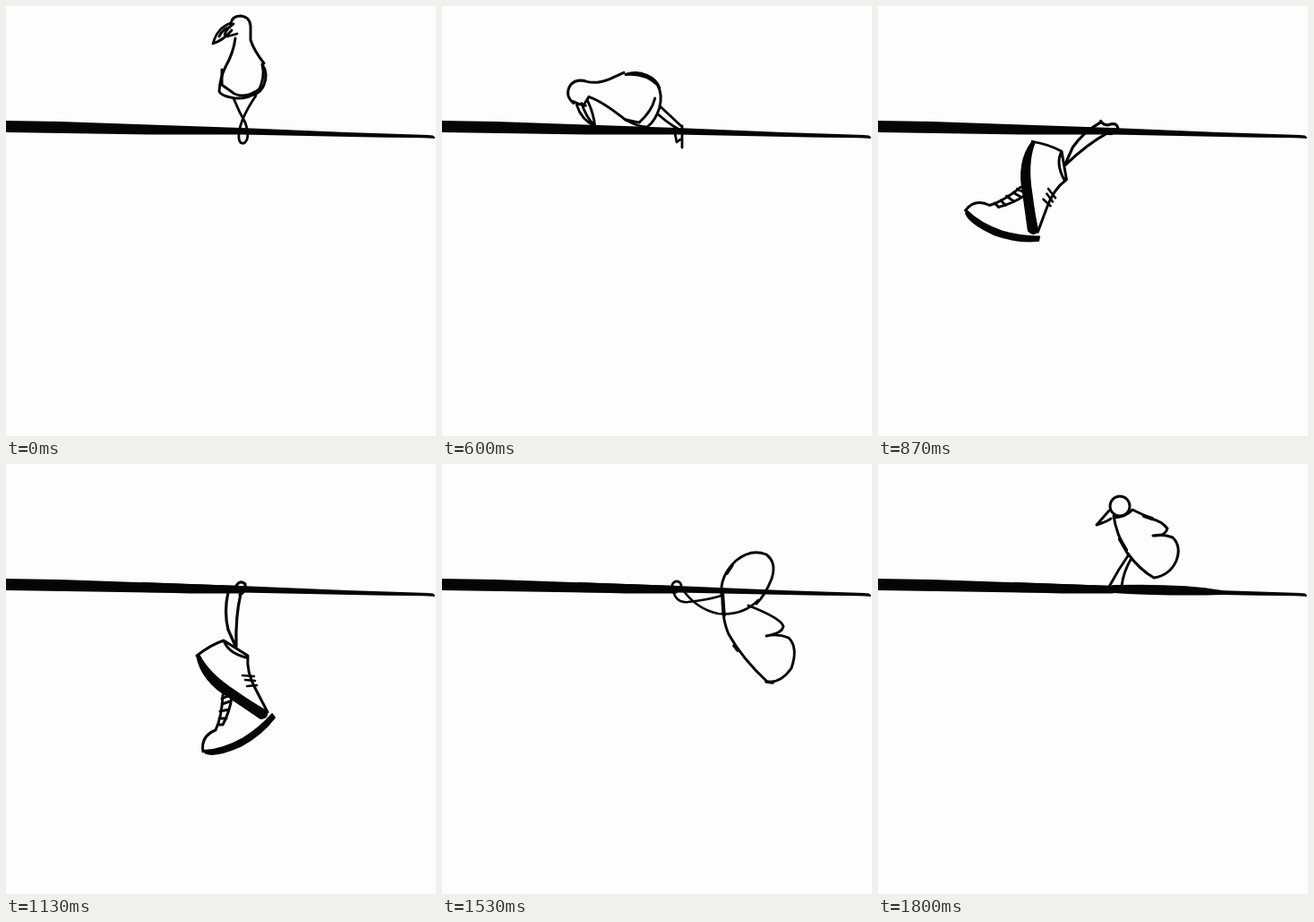
Write an HTML page with a canvas that moves like this. It is 480x480 px and loops after 1.87 s.

```html
<!DOCTYPE html>
<html lang="en">
<head>
<meta charset="utf-8">
<title>Bird on a wire</title>
<style>
html, body { margin: 0; width: 100%; height: 100%; overflow: hidden; background: #fdfdfd }
canvas { display: block; width: 480px; height: 480px }
</style>
</head>
<body>
<canvas id="stage" width="480" height="480"></canvas>
<script>
const LOOP = 1870, INK = '#050505', PAPER = '#fdfdfd';
const ctx = document.getElementById('stage').getContext('2d');

// kind: number = line width, 'paper' = white fill, 'ink' = black fill with a soft edge
const part = (kind, d) => ({ kind, path: new Path2D(d) });

const wire = part('ink', 'M0 129L60 130L160 133.5L262 137L380 142L472 145Q477 145 478 147Q472 146 410 145.5L262 142.5L160 142.5L0 140Z');
const wireJoint = part('ink', 'M152 133L262 137L262 143.5L205 143.5L152 142Z');
const wireBulge = part('ink', 'M262 136Q340 134 384 142L384 145Q330 147 262 143Z');

const upright = [
  part('paper', 'M251 20Q252 11 262 11Q272 12 273 22L273 38Q277 50 287 63Q293 80 280 97Q255 106 238 95Q239 75 245 68Q254 52 256 36Z'),
  part(3, 'M251 20Q252 11 262 11Q272 12 273 22L273 38Q277 50 288 64M256 36Q254 52 245 68Q239 80 238 95Q239 100 255 103Q270 104 281 96'),
  part(3, 'M286 65Q293 75 288 88Q285 96 277 99M286 65Q290 80 281 96M241 71L241 88Q248 93 255 98Q268 104 284 92'),
  part(2.8, 'M251 19Q236 24 231 42Q243 38 252 27M254 20Q246 25 244 32M238 34Q243 24 250 24M247 34L258 31'),
  part(2.8, 'M254 103Q260 118 267 130Q273 148 266 153Q259 155 260 142Q262 125 279 100')
];

const leanLegs = [part(2.9, 'M241 113Q252 126 267 136M260 96Q264 110 261 134M248 113L262 132M261 135Q258 152 264 154Q271 150 268 135')];
const leanBody = [
  part('paper', 'M183 38Q183 24 196 22Q206 22 211 33Q220 47 246 58Q262 72 261 94Q256 106 243 113Q228 120 218 116Q208 105 208 92Q206 60 200 47Z'),
  part(3, 'M183 38Q183 24 196 22Q206 22 211 33Q216 43 230 50L246 57M200 47Q206 60 208 93Q213 113 219 117Q230 119 243 113Q257 106 261 94Q262 75 246 60'),
  part(3, 'M246 60Q257 66 261 78Q265 90 260 98M208 93L216 107Q235 109 248 102'),
  part(2.9, 'M184 36Q186 44 190 50M184 42Q175 57 180 73Q190 62 196 47M180 73Q181 58 189 45M188 48L200 46')
];

const flipLegs = [part(2.8, 'M236 105L267 134M235 115Q250 130 265 138M259 137L262 152L266 149M268 134L268 158')];
const flipBody = [
  part('paper', 'M202 98Q190 103 176 118Q166 130 163 142Q150 150 153 162Q156 174 184 175L172 154Q205 145 228 130Q240 105 250 80Q262 45 249 44Q240 46 230 73Q218 50 213 54L203 72Z'),
  part(3, 'M202 98Q190 103 176 118Q166 130 164 143Q151 150 153 161Q156 174 170 174L184 175Q182 166 169 157Q167 166 169 174M171 160Q178 166 181 173'),
  part(4.4, 'M170 156Q205 149 229 130Q236 123 235 115M202 102Q224 103 236 119'),
  part(3, 'M201 98Q201 83 203 72Q207 64 216 76Q204 60 213 54C222 49 224 68 231 73C237 69 236 44 249 44C260 46 257 65 250 82L236 110M196 99L202 104')
];

const shoes = [
  part(3.2, 'M248 143Q243 165 248 185L256 203M262 145Q256 170 257 204M247 142Q255 143 257 136Q261 129 267 134Q268 143 261 146'),
  part('paper', 'M242 257Q241 282 234 296Q219 304 219 321L265 308L298 280L285 262Z'),
  part(3, 'M242 258Q241 282 234 297Q217 304 220 321M252 260Q250 276 242 291M241 268L250 265M239 276L249 274M238 284L246 284M236 291L242 291M241 262L250 258'),
  part('ink', 'M221 320Q242 319 265 306Q284 294 297 279L300 283Q286 302 262 315Q235 327 223 323Z'),
  part('paper', 'M213 214Q228 202 243 196L269 214Q270 235 280 252L292 278L283 283L230 243Z'),
  part(3, 'M213 214Q228 202 243 197Q254 204 270 214Q268 232 279 252L292 277M243 197Q248 211 268 216'),
  part('ink', 'M213 214L216 214Q227 235 255 253Q275 267 291 276Q293 284 284 284Q265 271 250 261Q218 242 213 214Z'),
  part(2.6, 'M264 236L277 237M267 241L278 242M269 248L280 247')
];

const knot = part(2.8, 'M257 136A5 5 0 1 1 267 136A5 5 0 1 1 257 136');
const swing = [
  knot,
  part(2.8, 'M262 139Q263 150 276 172Q290 190 308 220M266 140Q281 160 297 188'),
  part(2.9, 'M300 185Q275 190 254 210Q232 230 223 256Q230 272 248 275Q268 274 273 263Q274 250 270 241Q276 250 284 255Q291 241 293 228Q298 205 299 185'),
  part(2.9, 'M298 186Q302 178 315 184Q340 188 362 203Q368 210 364 220Q358 230 336 230Q312 228 300 216Q293 205 299 185'),
  part(3.8, 'M302 181Q325 185 350 197M297 185L295 211L306 222M258 205L250 214M278 193L292 187')
];

const lift = [
  knot,
  part(2.6, 'M258 142Q262 156 275 154Q295 152 312 147M270 142Q285 162 308 167Q335 170 353 152'),
  part(2.9, 'M312 146Q310 125 328 108Q345 94 362 101Q374 110 368 128Q361 146 351 156'),
  part(2.9, 'M313 142Q312 172 320 190Q335 217 363 243Q378 245 390 228Q398 205 387 194Q375 189 362 192Q380 189 381 181Q378 172 342 158'),
  part(3.6, 'M313 140L315 169M326 203L330 208M362 243L369 244M324 113L318 122')
];

const landing = [
  part('paper', 'M263 57Q266 78 278 99Q292 118 308 127Q326 124 333 108Q339 92 329 82L307 79L323 72Q315 64 283 51Z'),
  part(2.9, 'M259 47A11 11 0 1 1 281 47A11 11 0 1 1 259 47M258 52L244 68Q254 65 260 61'),
  part(3, 'M263 58Q266 78 278 99Q292 118 308 127Q326 124 333 108Q339 92 329 82Q319 78 307 80Q321 81 323 72Q317 64 305 61L284 51Q277 59 263 60'),
  part(4.2, 'M270 84L277 96M297 58L306 61'),
  part(2.9, 'M280 101Q268 118 258 137M283 105Q274 120 272 136')
];

const GRIP = [263, 137], HIP = [244, 114];
const pose = (at, body, turn = 0, pivot = GRIP, legs = []) => ({ at, body, turn, pivot, legs });

// One pose per change; the turn is clockwise in degrees.
const poses = [
  pose(0, upright),
  pose(470, leanBody, 0, HIP, leanLegs),
  pose(530, leanBody, -24, HIP, flipLegs),
  pose(600, leanBody, -48, HIP, flipLegs),
  pose(670, flipBody, 24, HIP, flipLegs),
  pose(730, flipBody, 0, HIP, flipLegs),
  pose(800, [...flipLegs, ...flipBody], -24),
  pose(870, shoes, 48),
  pose(930, shoes, 27),
  pose(1000, shoes, 14),
  pose(1070, shoes, 6),
  pose(1130, shoes),
  pose(1200, shoes, -5),
  pose(1400, swing),
  pose(1470, swing, -13),
  pose(1530, lift),
  pose(1670, lift, -25),
  pose(1730, landing, 24),
  pose(1800, landing)
];

function draw({ kind, path }) {
  if (kind === 'paper') {
    ctx.fillStyle = PAPER;
    ctx.fill(path);
    return;
  }
  if (kind === 'ink') {
    ctx.fillStyle = INK;
    ctx.fill(path);
  }
  ctx.lineWidth = kind === 'ink' ? 1.8 : kind;
  ctx.stroke(path);
}

function render(now) {
  const t = now % LOOP;
  const { body, turn, pivot: [x, y], legs } = poses.findLast(p => p.at <= t);
  ctx.fillStyle = PAPER;
  ctx.fillRect(0, 0, 480, 480);
  ctx.strokeStyle = INK;
  ctx.lineCap = ctx.lineJoin = 'round';
  draw(wire);
  if (t >= 930) draw(wireJoint);
  if (t >= 1670) draw(wireBulge);
  legs.forEach(draw);
  ctx.save();
  ctx.translate(x, y);
  ctx.rotate(turn * Math.PI / 180);
  ctx.translate(-x, -y);
  body.forEach(draw);
  ctx.restore();
}

const start = performance.now();
function tick() {
  render(performance.now() - start);
  requestAnimationFrame(tick);
}
tick();
</script>
</body>
</html>
```
